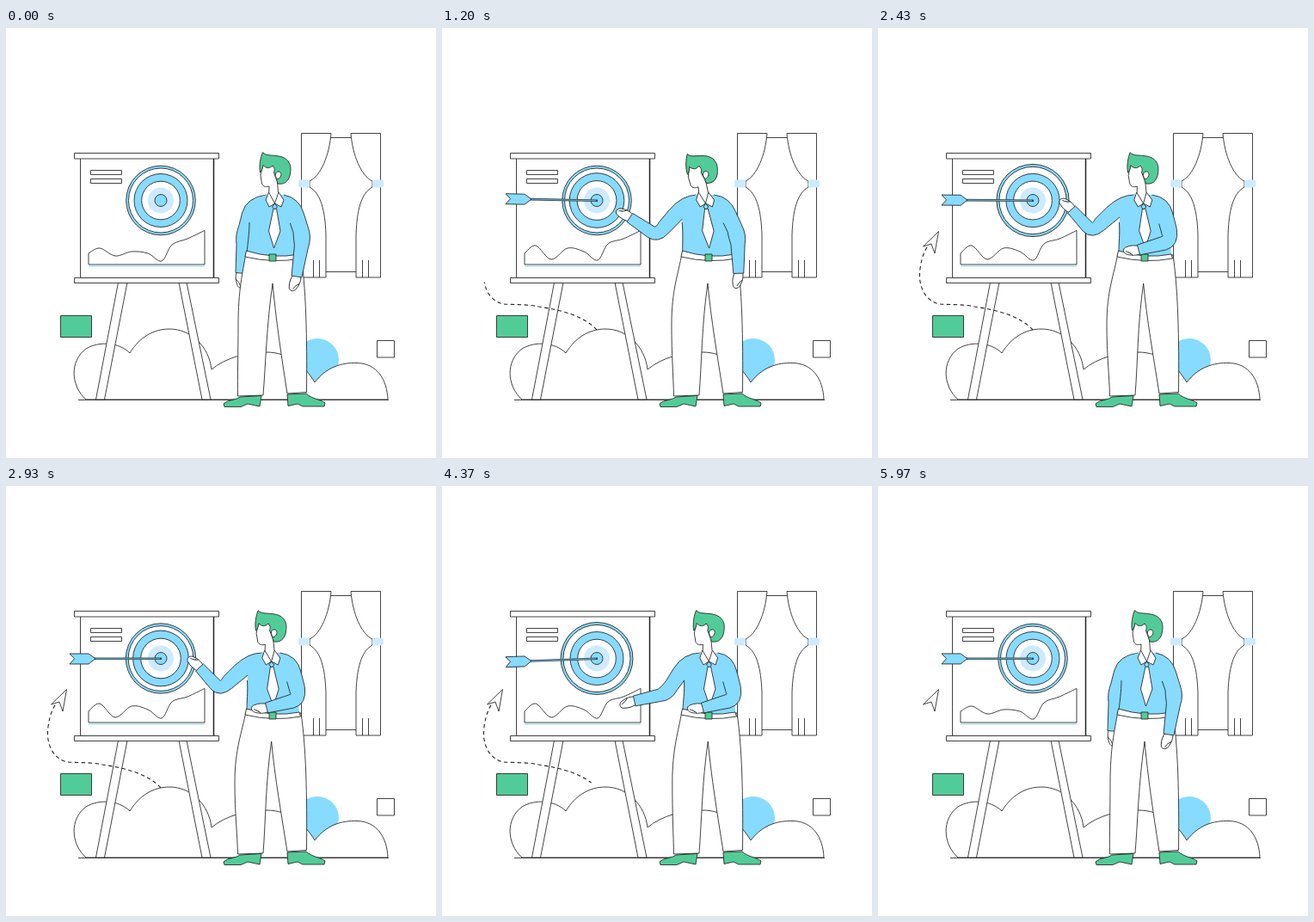
Write an HTML page that moves like this. It is 500x500 px and loops after 6000 ms.

```html
<!DOCTYPE html>
<html lang="en">
<head>
<meta charset="utf-8">
<title>Presenter at the target board</title>
<style>
html, body { margin: 0; width: 100%; height: 100%; overflow: hidden; background: #fff; }
svg { display: block; width: 100vw; height: 100vh; }
.ink { stroke: #222; stroke-width: .85; stroke-linejoin: round; }
.w { fill: #fff; }
.b { fill: #86dbff; }
.g { fill: #51cc98; }
.p { fill: #cdeaff; }
.n { fill: none; }
</style>
</head>
<body>
<svg viewBox="0 0 500 500" fill="none">
  <defs>
    <g id="curtain">
      <path class="ink w" d="M343.5 122.5H378C376 148 366 172 353 178L353 185C366 192 371 212 372 240V290H343.5Z"/>
      <path class="ink n" d="M357.5 270V290M364.5 270V290"/>
      <rect class="p" x="340" y="176.500" width="13" height="9" rx="2"/>
    </g>
    <path id="hand" d="M-2-4.500C4-7 10-6 15-4C19-1 18 3 14 4C9 6 4 5.500-2 4.500Z M7-6C9-3 12-2 15-1"/>
    <path id="route" pathLength="100" d="M180 351C165 335 140 328 112 324C100 321 85 322 72 321C55 318 46 300 49 280C51 264 56 255 62 248"/>
    <mask id="trim" maskUnits="userSpaceOnUse" x="30" y="220" width="170" height="150">
      <use href="#route" id="wipe" stroke="#fff" stroke-width="8"/>
    </mask>
  </defs>

  <path class="ink n" d="M376 127.500H404M372 283.500H407"/>
  <use href="#curtain"/>
  <use href="#curtain" transform="matrix(-1 0 0 1 779 0)"/>

  <circle class="b" cx="362" cy="386" r="25"/>
  <path class="ink w" d="M93 432C75 416 74 387 93 373C108 364 131 365 144 378C155 360 171 350 190 350C216 350 236 371 239 397C256 383 280 377 303 377C328 377 347 392 359 412C373 394 390 389 408 389.500C431 390 443 408 444 432Z"/>
  <path class="ink" d="M84 432.500H445"/>
  <rect class="ink g" x="63.500" y="334.500" width="36" height="25"/>
  <rect class="ink w" x="431.500" y="363.500" width="20" height="19.500"/>

  <path class="ink w" d="M130.500 296L104.500 432H114.500L141 296ZM201 296L228 432H238L210 296Z"/>
  <rect class="ink w" x="86.500" y="151" width="155" height="140"/>
  <path d="M241.500 152V290" stroke="#222" stroke-width="1.500"/>
  <rect class="ink w" x="79.500" y="145.500" width="168" height="6.500"/>
  <rect class="ink w" x="79.500" y="290.500" width="168" height="6"/>
  <path class="ink w" d="M98.500 165.500H134.500V170.500H98.500ZM98.500 175.500H134.500V180.500H98.500Z"/>
  <path d="M96 277H231" stroke="#c4e8ff" stroke-width="2"/>
  <path id="chart" class="ink w"/>

  <g transform="translate(180 200.500)">
    <g id="rim"><circle class="ink b" r="40.300"/><circle class="ink w" r="37.500"/></g>
    <g id="band"><circle class="ink b" r="31"/><circle class="ink w" r="22.300"/></g>
    <circle class="p" r="15"/><circle class="ink b" r="7"/>
  </g>

  <use href="#route" mask="url(#trim)" stroke="#222" stroke-width="1.100" stroke-dasharray="2.200 1.700"/>
  <path id="pointer" class="ink w" d="M9.500-16.500L-8.500 1L1-2L5 9Z"/>

  <g id="arrow">
    <path d="M103 200.800H182" stroke="#2f4650" stroke-width="2.600"/>
    <path d="M103 200.800H180" stroke="#79bcd6" stroke-width=".9"/>
    <path class="ink b" d="M75 195H97L105 200.800L97 207H75L80.500 200.800Z"/>
  </g>

  <g id="handL" class="ink w"><use href="#hand" transform="scale(1 -1)"/></g>
  <path id="armL" class="ink b"/>
  <path id="legs" class="ink w"/>
  <path class="ink g" d="M253 437C258 432 267 433 272 429L297 427.500L295 440L281 437L273 440.500H254Z"/>
  <path class="ink g" d="M327 426L349 425C355 431 366 432 371 436L370 440H345L339 437L328 439.500Z"/>

  <g id="head">
    <path class="ink w" d="M299 158L296 171L297.500 181C299 185 303 185 306 184L305.500 197H317L315.500 179L318 162Z"/>
    <path class="ink g" d="M295.500 168C294 160 296 150 298.500 144.500C302 148.500 307 147.500 313 148.500C321 149 327 152 329 156.500C332 161 331 167 330 172C328 178 324 182.500 316 181L314 175L311.500 168C313 164 312 162 310 160C306 164 302 163 299 159.500C298.500 163 297.500 166 295.500 168Z"/>
    <path class="ink w" d="M315.500 176C312 172 313 167 317 167C321 167 321 174 315.500 176Z"/>
  </g>

  <g id="torso">
    <path class="b" d="M303 194L288 199L283 226L280 265L342 268L338 230L334 200L323 194Z"/>
    <path class="ink" d="M283 226C283 240 281 250 280 262"/>
    <path class="ink w" d="M311 210L305.500 236L311.500 256L319 236L314.500 210Z"/>
    <path class="ink w" d="M305.500 191L302 200L306 208L312.500 204L320 208L323 200L317 191M305.500 191L312.500 204L317 191"/>
    <path class="ink b" d="M312.500 204L309.500 208L312.500 211L315.500 208Z"/>
  </g>
  <path class="ink w" d="M279.500 259Q311 269 341 263L342.500 268Q311 274 278 266Z"/>
  <rect class="ink g" x="306" y="263" width="8" height="8"/>

  <g id="handR" class="ink w"><use href="#hand"/></g>
  <path id="armR" class="ink b"/>
</svg>

<script>
const LOOP = 6000, TAU = Math.PI * 2, RAD = Math.PI / 180;
const el = Object.fromEntries([...document.querySelectorAll('[id]')].map(e => [e.id, e]));
const set = (id, name, value) => el[id].setAttribute(name, value);

const span = (t, a, b) => Math.min(1, Math.max(0, (t - a) / (b - a)));
const ease = (t, a, b) => { const u = span(t, a, b); return u * u * (3 - 2 * u); };
const mix = (a, b, u) => a.map((v, i) => v + (b[i] - v) * u);
// Pass through the poses one after another, one progress value per change.
const chain = (poses, steps) => steps.reduce((pose, u, i) => mix(pose, poses[i + 1], u), poses[0]);

const dir = a => [Math.cos(a * RAD), Math.sin(a * RAD)];
const move = (p, d, k) => [p[0] + d[0] * k, p[1] + d[1] * k];
const xy = p => p.map(v => v.toFixed(2)).join(' ');

// Shoulder, elbow and wrist become a shoulder with two swinging bones.
function arm(S, E, W) {
  const bone = (p, q) => {
    const x = q[0] - p[0], y = q[1] - p[1];
    return [(Math.atan2(y, x) / RAD + 360) % 360, Math.hypot(x, y)];
  };
  return [...S, ...bone(S, E), ...bone(E, W)];
}

// body: sway, head turn, knee shift
const rest = {
  body: [0, 0, 0],
  left: arm([287, 207], [276, 243], [273, 285]),
  right: arm([334, 208], [345, 244], [338, 289])
};
const point = {
  body: [-7, -8, -3],
  left: arm([280, 208], [250, 242], [218, 221]),
  right: arm([328, 207], [344, 242], [348, 285])
};
const fold = {
  body: [-4.5, -1, -4],
  left: arm([282, 207], [249, 237], [225, 211]),
  right: arm([331, 207], [341, 248], [303, 258])
};
const acts = [rest, point, fold, rest];

// Tapered sleeve from collar to cuff; side is 1 for the left arm, -1 for the right.
function drawArm(name, pose, collar, side, width, pit, handTurn) {
  const [x, y, a1, l1, a2, l2] = pose;
  const u = dir(a1), v = dir(a2), n = dir(a1 + 90 * side), m = dir(a2 + 90 * side);
  const bis = dir((a1 + a2) / 2 + 90 * side);
  const S = [x, y], E = move(S, u, l1), W = move(E, v, l2);
  const upper = (k, w) => xy(move(move(S, u, l1 * k), n, w));
  const lower = (k, w) => xy(move(move(E, v, l2 * k), m, w));
  const bend = w => xy(move(E, bis, w * 1.25));
  set('arm' + name, 'd',
    `M${xy(collar)}Q${upper(-.2, 10)} ${upper(.3, 9.5)}L${upper(.7, width + 1)}` +
    `Q${bend(width)} ${lower(.22, width - .5)}L${lower(1, 6)}L${lower(1, -6)}` +
    `L${lower(.22, -width + .5)}Q${bend(-width)} ${upper(.75, -width)}L${upper(pit, -9)}`);
  set('hand' + name, 'transform', `translate(${xy(W)}) rotate(${a2 + handTurn})`);
}

// Chart points: x, y and how far each one shifts as the waves grow.
const hills = [
  [96, 262, 0], [109, 256, -3], [127, 265, 4], [146, 260, -4],
  [165, 262, -2], [181, 271, -1], [193, 252, -1], [211, 245, 0], [231, 235.5, 0]
];
function chartPath(grow) {
  const pts = hills.map(([x, y, d]) => [x, y + d * grow]);
  const at = i => pts[Math.min(pts.length - 1, Math.max(0, i))];
  const handle = (i, k) => xy(at(i).map((v, c) => v + k * (at(i + 1)[c] - at(i - 1)[c]) / 6));
  const curve = pts.slice(1).map((p, i) => `C${handle(i, 1)} ${handle(i + 1, -1)} ${xy(p)}`);
  return `M96 275L${xy(pts[0])}${curve.join('')}V275Z`;
}

const pulse = (t, delay) => 1 + .045 * Math.max(0, Math.sin(TAU * (t / 2000 - delay)));

function draw(t) {
  const raise = ease(t, 30, 700), bend = ease(t, 1050, 2150);
  const lower = ease(t, 3600, 5250), drop = ease(t, 4650, 5700);
  const part = (key, last) => chain(acts.map(a => a[key]), [raise, bend, last]);

  const [sway, turn, knee] = part('body', lower);
  const k = sway / 70, left = 270 + knee, mid = 311 + knee / 3;
  set('torso', 'transform', `matrix(1 0 ${-k} 1 ${265 * k} 0)`);
  set('head', 'transform', `translate(${sway} 0) rotate(${turn} 311 193)`);
  set('legs', 'd',
    `M279 262C275 285 ${left} 305 ${left} 345C${left} 380 269 405 269.500 428L299 427` +
    `C302 390 ${mid - 8} 345 ${mid - 1} 297C${mid + 3} 340 320 380 327 425L349.500 423.500C350 380 350 310 343 264Z`);
  drawArm('L', part('left', lower), [303 + sway, 194], 1, 7.8, .2, -6);
  drawArm('R', part('right', drop), [323 + sway, 194], -1, 8.6, .45, 12);

  const slide = -46 * (1 - ease(t, 60, 450));
  const tilt = 2 * Math.cos(TAU * (t - 1670) / 5400) ** 3 * span(t, 400, 770);
  set('arrow', 'transform', `translate(${slide - 1} 0) rotate(${tilt} 181 201)`);
  set('arrow', 'opacity', span(t, 40, 180));
  set('chart', 'd', chartPath(ease(t, 0, 600) - ease(t, 4600, 5600)));
  set('rim', 'transform', `scale(${pulse(t, 0)})`);
  set('band', 'transform', `scale(${pulse(t, .2)})`);

  const from = 100 * span(t, 4300, 5950), to = 100 * span(t, 370, 1480);
  set('wipe', 'stroke-dasharray', `0 ${from} ${Math.max(0, to - from)} 300`);
  set('pointer', 'transform', `translate(61 253) scale(${span(t, 1450, 1940)})`);
  set('pointer', 'visibility', t > 1450 ? 'visible' : 'hidden');
}

const start = performance.now();
function tick() {
  draw((performance.now() - start) % LOOP);
  requestAnimationFrame(tick);
}
tick();
</script>
</body>
</html>
```
